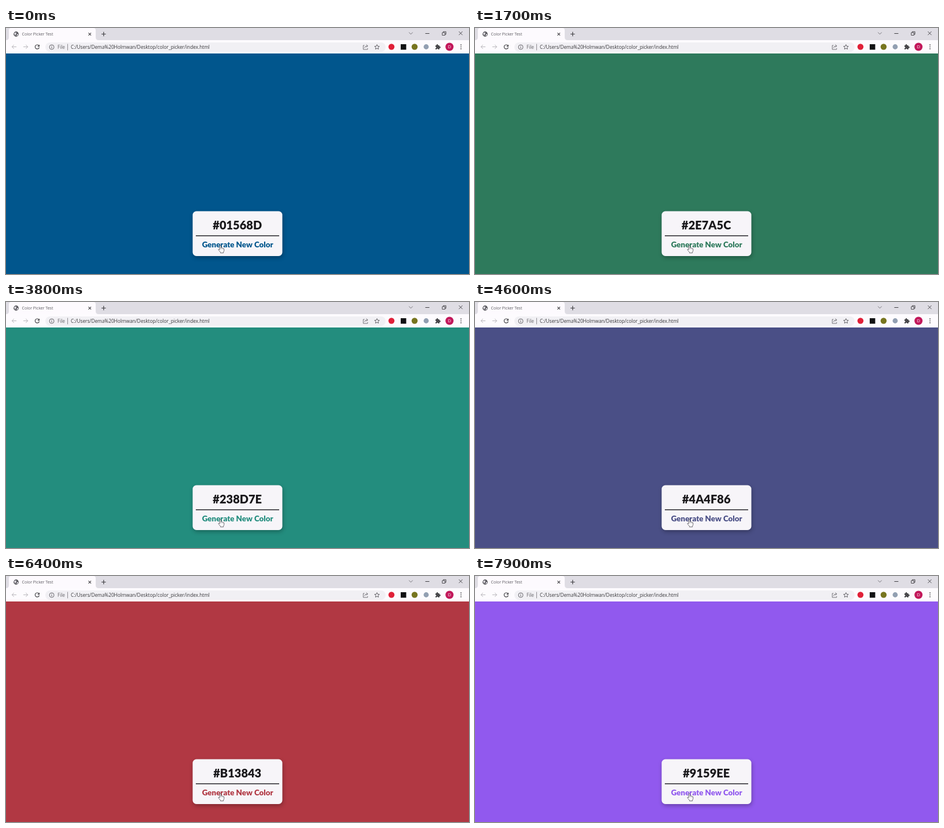
An HTML page with a canvas for the animation above (8 s loop, 800 px wide and 425 px high).

```html
<!DOCTYPE html>
<html lang="en">
<head>
<meta charset="utf-8">
<title>Color Picker Test</title>
<style>
  html, body { margin: 0; width: 100%; height: 100%; overflow: hidden; }
  canvas { display: block; width: 800px; height: 425px; }
</style>
</head>
<body>
<canvas id="stage" width="800" height="425"></canvas>
<script>
const ctx = document.getElementById('stage').getContext('2d');
const LOOP = 8000;
const UI_FONT = '"Open Sans", "Noto Sans", sans-serif';
const CARD_FONT = 'Lato, "Open Sans", sans-serif';
const INK = '#48474b';

// Start time in ms and the color picked then
const picks = [
  [0, '#01568D'],
  [300, '#100F47'],
  [1600, '#2E7A5C'],
  [2800, '#0BE437'],
  [3800, '#238D7E'],
  [4600, '#4A4F86'],
  [5500, '#610162'],
  [6200, '#B13843'],
  [7000, '#A2489B'],
  [7800, '#9159EE']
];

function rect(x, y, w, h, fill) {
  ctx.fillStyle = fill;
  ctx.fillRect(x, y, w, h);
}

function round(x, y, w, h, r, fill) {
  ctx.beginPath();
  ctx.roundRect(x, y, w, h, r);
  ctx.fillStyle = fill;
  ctx.fill();
}

function disc(x, y, r, fill) {
  ctx.beginPath();
  ctx.arc(x, y, r, 0, Math.PI * 2);
  ctx.fillStyle = fill;
  ctx.fill();
}

function stroke(d, color, width = 1) {
  ctx.strokeStyle = color;
  ctx.lineWidth = width;
  ctx.stroke(new Path2D(d));
}

function fill(d, color) {
  ctx.fillStyle = color;
  ctx.fill(new Path2D(d));
}

function text(str, x, y, font, color, align = 'left') {
  ctx.font = font;
  ctx.textAlign = align;
  ctx.fillStyle = color;
  ctx.fillText(str, x, y);
}

function drawTabs() {
  rect(0, 0, 800, 21, '#dfdde4');
  fill('M0 21 Q5 21 5 16 V4 Q5 0 9 0 H151 Q155 0 155 4 V16 Q155 21 160 21 Z', '#fdfafe');

  disc(17.5, 10.5, 4.4, '#55545a');
  fill('M14 9 L17 7.5 L18.5 9 L16.5 10.5 L17 12 L15.5 13 Z M18.5 11 L21 10 L20.5 12.5 L18.5 14 Z', '#e9e6ec');
  text('Color Picker Test', 27.5, 13, '7px ' + UI_FONT, '#5c5a60');
  stroke('M142.5 8.3 L147 12.8 M147 8.3 L142.5 12.8', '#3f3e42', 1.1);
  stroke('M165 10.5 H172.5 M168.75 6.75 V14.25', '#3f3e42', 1.2);

  stroke('M696.3 7.5 L699.5 10.8 L702.7 7.5', '#6b696f', 0.9);
  stroke('M724.5 9.5 H731.5', '#3f3e42');
  stroke('M753.8 8 H758.5 V12.5 H753.8 Z M755.5 8 V6.3 H760.2 V11 H758.5', '#3f3e42', 0.9);
  stroke('M782.5 6 L788.7 12.2 M788.7 6 L782.5 12.2', '#3f3e42', 0.9);
}

function drawToolbar() {
  rect(0, 21, 800, 23, '#fdfbfe');

  stroke('M18 32.5 H10.3 M13.8 29 L10.3 32.5 L13.8 36', '#b9b7bc');
  stroke('M30 32.5 H37.7 M34.2 29 L37.7 32.5 L34.2 36', '#b9b7bc');
  stroke('M56.6 30.2 A3.6 3.6 0 1 0 57.4 33.5', INK, 1.2);
  fill('M58 28.4 V32.2 H54.2 Z', INK);

  round(68, 25, 588, 16, 8, '#f1f0f4');
  ctx.beginPath();
  ctx.arc(79, 33, 4, 0, Math.PI * 2);
  ctx.strokeStyle = '#5c5a60';
  ctx.lineWidth = 0.9;
  ctx.stroke();
  rect(78.5, 32.4, 1, 2.8, '#5c5a60');
  rect(78.5, 30.6, 1, 1, '#5c5a60');
  text('File', 89, 35.8, '8.2px ' + UI_FONT, '#66646a');
  rect(106, 27.5, 1, 11, '#8d8b91');
  text('C:/Users/Dema%20Holmwan/Desktop/color_picker/index.html',
    112, 35.8, '8.27px ' + UI_FONT, '#38373b');

  stroke('M619.5 30 H617.3 V37 H624.8 V34.8 M619.5 34.5 Q620 31 624 31 M622.5 28.7 L625.2 31 L622.5 33.3', '#66646a', 0.9);
  stroke('M641 28.7 L642.2 31.4 L645.2 31.7 L643 33.7 L643.6 36.6 L641 35.1 L638.4 36.6 L639 33.7 L636.8 31.7 L639.8 31.4 Z', '#55545a', 0.9);

  disc(666, 32.5, 5.2, '#e02038');
  rect(682, 28, 9.5, 9.5, '#111113');
  disc(706, 32.5, 5.2, '#77751f');
  disc(726, 32.5, 4.4, '#929fb2');

  // Extensions puzzle piece
  round(742, 30, 7, 7, 0.8, INK);
  disc(745.2, 29.5, 1.5, INK);
  disc(749.4, 33.3, 1.5, INK);
  disc(742.2, 33.7, 1.2, '#fdfbfe');
  disc(745.4, 37, 1.2, '#fdfbfe');

  disc(766.3, 32.5, 7, '#c2185b');
  text('D', 766.3, 35.2, '7.5px ' + UI_FONT, '#fbe9f1', 'center');
  for (const y of [29.3, 32.6, 35.9]) disc(786.2, y, 0.95, INK);
}

function drawCard(color) {
  ctx.save();
  ctx.shadowColor = 'rgba(0,0,0,0.28)';
  ctx.shadowBlur = 7;
  ctx.shadowOffsetX = 1;
  ctx.shadowOffsetY = 3;
  round(322.5, 316.5, 155, 77.5, 6.5, '#f7f5f9');
  ctx.restore();

  text(color, 399.7, 348, '900 20px ' + CARD_FONT, '#19181b', 'center');
  rect(328, 358.2, 144, 1.5, '#252428');
  text('Generate New Color', 400.2, 378.9, '900 13.4px ' + CARD_FONT, color, 'center');
}

function drawHand() {
  const hand = 'M369.3 376.3 Q370.5 375 371.5 376.4 V380 ' +
    'Q372.6 379.2 373.5 380.2 Q374.6 379.7 375.2 380.8 ' +
    'Q376.8 380.6 376.8 382.2 V384.6 Q376.6 386 375.7 387 V388.6 ' +
    'H370.5 V387.3 L367.3 383.6 Q366.5 382.2 368 381.9 L369.3 383 Z';
  fill(hand, '#fcfbfd');
  stroke(hand, '#4c4b50', 0.8);
  stroke('M371.5 380 V382.3 M373.5 380.4 V382.4 M375.2 381 V382.6', '#77757b', 0.5);
}

function draw(color) {
  rect(0, 0, 800, 425, color);
  drawTabs();
  drawToolbar();
  drawCard(color);
  drawHand();
}

let shown = '';
function tick() {
  const t = performance.now() % LOOP;
  const color = picks.findLast(p => p[0] <= t)[1];
  if (color !== shown) draw(shown = color);
  requestAnimationFrame(tick);
}
tick();
</script>
</body>
</html>
```
